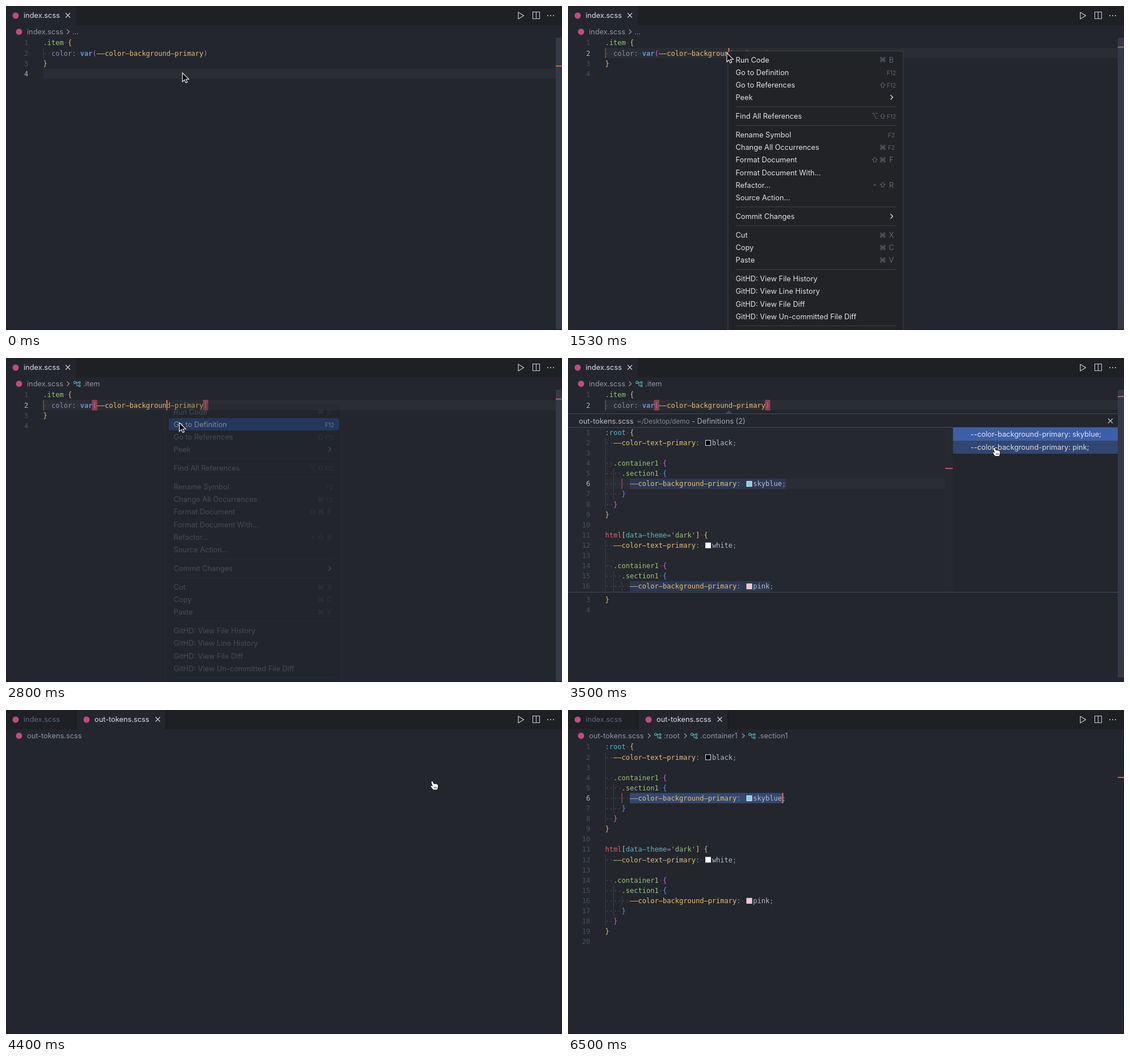
Recreate the animation shown at these times as an HTML page. Size 980 by 572 pixels, loop 6560 ms.

```html
<!DOCTYPE html>
<html lang="en">
<head>
<meta charset="utf-8">
<title>Go to definition</title>
<style>
  html, body { margin: 0; width: 100%; height: 100%; overflow: hidden; background: #23262d; }
  svg { display: block; }
  text { white-space: pre; }
  .ui { font-family: Inter, "DejaVu Sans", sans-serif; font-size: 12.8px; }
  .code { font-family: "DejaVu Sans Mono", monospace; font-size: 12.04px; }
  .key { font-family: Inter, "DejaVu Sans", sans-serif; fill: #65676d; }
</style>
</head>
<body>
<svg id="stage" width="980" height="572" viewBox="0 0 980 572"></svg>
<script>
const LOOP = 6560, CELL = 7.25, LINE = 18.1, LEFT = 65.5, TOP = 56, PEEK = 122.4;
const BG = '#23262d', BAR = '#1e2024', MARK = '#c2654f';
const GREEN = '#98c379', YELLOW = '#e3bd74', CYAN = '#56b6c2', BLUE = '#5b90ea',
      PINK = '#cc62d6', RED = '#d9626b', PLAIN = '#b4bac6', DIM = '#868c99', DOT = '#484d59';
const DEPTH = [YELLOW, PINK, BLUE];
const SWATCH = { black: '#000', white: '#fff', skyblue: '#87ceeb', pink: '#ffc0cb' };

const indexLines = ['.item {', '  color: var(--color-background-primary)', '}', ''];
const theme = (head, text, back) => [
  head + ' {', `  --color-text-primary: ${text};`, '', '  .container1 {', '    .section1 {',
  `      --color-background-primary: ${back};`, '    }', '  }', '}', ''];
const tokenLines = [
  ...theme(':root', 'black', 'skyblue'),
  ...theme("html[data-theme='dark']", 'white', 'pink')];

const col = n => LEFT + n * CELL;
const rect = (x, y, w, h, fill, extra = '') =>
  `<rect x="${x}" y="${y}" width="${w}" height="${h}" fill="${fill}" ${extra}/>`;
const label = (x, y, s, fill, extra = '') =>
  `<text class="ui" x="${x}" y="${y}" fill="${fill}" ${extra}>${s}</text>`;
const path = (d, stroke, w = 1.1, extra = '') =>
  `<path d="${d}" fill="none" stroke="${stroke}" stroke-width="${w}" ${extra}/>`;
const group = (id, body, extra = '') => `<g id="${id}" ${extra}>${body}</g>`;
const cross = (x, y, c) => path(`M${x - 4} ${y - 4}l8 8m0-8l-8 8`, c, 1.2);
const chevron = (x, y, c, s = 4) => path(`M${x - s / 2} ${y - s}l${s} ${s}l${-s} ${s}`, c, 1.3);
const fileDot = (x, y) => `<circle cx="${x}" cy="${y}" r="5.5" fill="#bf4c7c"/>`;

const rules = [
  [/^ /, () => DOT],
  [/^\.\w+/, () => GREEN],
  [/^:root/, () => CYAN],
  [/^html/, () => RED],
  [/^[\[\]]/, () => YELLOW],
  [/^data-theme/, () => CYAN],
  [/^'dark'/, () => GREEN],
  [/^--[\w-]+/, () => YELLOW],
  [/^color/, () => '#8790b3'],
  [/^var/, () => BLUE],
  [/^[()]/, () => PINK],
  [/^(black|white|skyblue|pink)/, () => PLAIN],
  [/^[{}]/, d => DEPTH[d]],
  [/^./, () => DIM]];

function codeLine(src, y, swatches) {
  const depth = Math.min(2, src.search(/\S/) / 2);
  let out = '', boxes = '', at = 0;
  while (src) {
    const [re, color] = rules.find(r => r[0].test(src));
    const word = src.match(re)[0];
    src = src.slice(word.length);
    if (SWATCH[word] && swatches) {
      boxes += rect(col(at) + 3, y - 8.6, 9, 9, SWATCH[word], 'stroke="#e8e8e8" stroke-width="1"');
      out += '\u00a0\u00a0';
      at += 2;
    }
    const shown = word.replace(/ /g, '·').replace(/-/g, '–');
    out += `<tspan fill="${color(depth)}"${word === 'var' ? ' font-weight="700"' : ''}>${shown}</tspan>`;
    at += word.length;
  }
  return `<text class="code" x="${LEFT}" y="${y}">${out}</text>${boxes}`;
}

const lineNo = (n, y, active) =>
  `<text class="code" x="39.3" y="${y}" text-anchor="end" fill="${active ? '#b0b4bd' : '#4a4f5e'}">${n}</text>`;

function codeBlock(lines, top, { active = 0, first = 1, swatches = false } = {}) {
  return lines.map((s, i) => {
    const y = top + LINE * i + 13.4;
    return lineNo(i + first, y, i + first === active) + codeLine(s, y, swatches);
  }).join('');
}

// Indent guide beside lines a..b (counted from 1)
const guide = (top, level, a, b, color = '#3d414b') =>
  rect(col(level * 2) + .1, top + LINE * (a - 1), 1, LINE * (b - a + 1), color);

const tokenGuides = top => [1, 11].map(s =>
  guide(top, 0, s + 1, s + 7) + guide(top, 1, s + 4, s + 6) +
  guide(top, 2, s + 5, s + 5, s === 1 ? '#b3624f' : undefined)).join('');

const tokenCode = (id, top) =>
  group(id + 'Raw', codeBlock(tokenLines, top, { active: 6 })) +
  group(id + 'Full', codeBlock(tokenLines, top, { active: 6, swatches: true }));

function symbol(x, name) {
  const c = CYAN;
  return path(`M${x + 4} 43h5M${x + 6} 43v6h3`, c) +
    [[2.5, 43, 2], [10.5, 43.5, 1.6], [10.5, 49, 1.6]].map(([a, y, r]) =>
      `<circle cx="${x + a}" cy="${y}" r="${r}" fill="none" stroke="${c}" stroke-width="1.1"/>`).join('') +
    label(x + 17, 50.4, name, '#9095a5');
}

function menuParts() {
  const sections = [
    [['Run Code', '⌘', 'B'], ['Go to Definition', '', 'F12'], ['Go to References', '⇧', 'F12'], ['Peek', '', '>']],
    [['Find All References', '⌥⇧', 'F12']],
    [['Rename Symbol', '', 'F2'], ['Change All Occurrences', '⌘', 'F2'], ['Format Document', '⇧⌘', 'F'],
     ['Format Document With...'], ['Refactor...', '^⇧', 'R'], ['Source Action...']],
    [['Commit Changes', '', '>']],
    [['Cut', '⌘', 'X'], ['Copy', '⌘', 'C'], ['Paste', '⌘', 'V']],
    ['File History', 'Line History', 'File Diff', 'Un-committed File Diff'].map(s => ['GitHD: View ' + s])];
  let y = 95, out = rect(282, 79.5, 309, 520, '#212327', 'rx="5" stroke="#43454b"');
  for (const rows of sections) {
    for (const [name, mods = '', key = ''] of rows) {
      out += label(295.5, y + 4.6, name, '#e0e1e3');
      [...mods].reverse().forEach((m, i) => {
        out += `<text class="key" x="${554.7 - 14 * i}" y="${y + (m === '^' ? 7 : 4.4)}" font-size="12.5" text-anchor="middle">${m}</text>`;
      });
      if (key === '>') out += chevron(570.5, y, '#e0e1e3');
      else if (key) out += `<text class="key" x="570" y="${y + 4.5}" font-size="${key[1] ? 10 : 12.8}" text-anchor="middle">${key}</text>`;
      y += 22.1;
    }
    out += rect(295.5, y - 6, 282.5, 1, '#414348');
    y += 11.05;
  }
  return out;
}

const picked = rect(287, 106, 300, 22, '#2854a8', 'rx="4"') +
  label(295.5, 121.7, 'Go to Definition', '#e8ebf2') +
  label(578.5, 121.6, 'F12', '#e0e6f4', 'text-anchor="end" style="font-size:10px"');

const peekTop = PEEK + LINE * 5;
const peek = path('M277.5 98.5l6-6l6 6z', 'none', 0, 'style="fill:#454b5c"') +
  rect(0, 98, 969, 316, BG) + rect(0, 122, 678, 291, '#25282f') +
  rect(0, 98, 969, 1, '#454b5c') + rect(0, 122, 969, 1, '#454b5c') + rect(0, 413, 969, 1, '#454b5c') +
  label(19, 115.6, 'out-tokens.scss', '#b9bdc7') +
  label(122, 115.6, '~/Desktop/demo', '#858a96', 'style="font-size:11.6px"') +
  label(218, 115.6, '- Definitions (2)', '#a6abb5') + cross(956, 111, '#c5c8cf') +
  group('peekBody',
    rect(LEFT, peekTop, 599, LINE, '#2b2d34') +
    rect(col(6), peekTop, 275, LINE, '#2c3852') + rect(col(6), PEEK + LINE * 15, 247, LINE, '#2c3852') +
    tokenGuides(PEEK) + tokenCode('peek', PEEK) +
    rect(665, 123, 13, 290, '#262930') + rect(665, 194, 13, 1.8, MARK), 'clip-path="url(#peekClip)"') +
  group('peekList',
    rect(678.5, 123, 290.5, 23, '#3d5fa6') + '<rect id="hover" x="678.5" y="146" width="290.5" height="23" fill="#32466f"/>' +
    label(709.5, 139.3, '--color-background-primary: skyblue;', '#e1e5ee') +
    label(709.5, 162.3, '--color-background-primary: pink;', '#d9dee9'));

const pairMark = n => rect(col(n) - .4, 74.4, 8, 17.6, '#8b404c', 'stroke="#a94f58" stroke-width=".8"');
const line2 = TOP + LINE;

const indexView =
  group('row4', rect(LEFT, TOP + LINE * 3, 903.5, LINE, '#2b2d34') + guide(TOP, 0, 2, 2)) +
  group('row2', rect(LEFT, line2, 903.5, LINE, '#2b2d34') + guide(TOP, 0, 2, 2, '#b3624f')) +
  group('pair', pairMark(12) + pairMark(39)) +
  group('head4', codeBlock(indexLines.slice(0, 2), TOP)) +
  group('head2', codeBlock(indexLines.slice(0, 2), TOP, { active: 2 })) +
  group('tail4', codeBlock(indexLines.slice(2), TOP + LINE * 2, { first: 3, active: 4 })) +
  group('tail2', codeBlock(indexLines.slice(2), TOP + LINE * 2, { first: 3 })) +
  rect(0, 0, 123, 34, BG) + fileDot(17, 17) + label(31, 21.4, 'index.scss', '#dcdee3') + cross(109, 16.5, '#d0d3d9') +
  fileDot(23, 45.5) + label(37, 50.4, 'index.scss', '#9095a5') + chevron(109.5, 45.5, '#9095a5') +
  group('crumbDots', label(117, 50.4, '...', '#9095a5')) + group('crumbItem', symbol(119, '.item')) +
  rect(969, 56, 11, 516, '#353846', 'id="slider"') + rect(969, 105, 11, 2, MARK, 'id="ruler"') +
  group('peek', peek);

const tokenView =
  rect(124, 0, 157.5, 34, BG) + rect(123, 0, 1, 34, '#18191d') + rect(281.5, 0, 1, 34, '#18191d') +
  fileDot(17, 17) + label(31, 21.4, 'index.scss', '#5d668f') +
  fileDot(142, 17) + label(156, 21.4, 'out-tokens.scss', '#dcdee3') + cross(267.5, 16.5, '#d0d3d9') +
  fileDot(23, 45.5) + label(37, 50.4, 'out-tokens.scss', '#9095a5') +
  group('crumbPath', [[143, ':root'], [207, '.container1'], [309, '.section1']].map(([x, s]) =>
    chevron(x, 45.5, '#9095a5') + symbol(x + 9, s)).join('')) +
  group('file', rect(col(6), TOP + LINE * 5, 269, LINE, '#344870') + tokenGuides(TOP) + tokenCode('file', TOP) +
    rect(969, 118, 11, 2, MARK));

const tools = path('M903 11v12l9.5-6z', '#c9ccd2', 1.2) +
  path('M928.5 10.5h12v12h-12zM934.5 10.5v12', '#c9ccd2') +
  [955, 960, 965].map(x => `<circle cx="${x}" cy="17" r="1.1" fill="#c9ccd2"/>`).join('');

const arrow = '<path d="M0 0V15.6L3.6 12.2L6 17.6L8.6 16.5L6.2 11.2H11.2Z" fill="#000" stroke="#fff" stroke-width="1.1"/>';
const hand = '<path d="M-3.4.8Q-2-.8-.5 1L1.5 5Q3 3.8 4.2 5Q5.8 4.2 6.6 5.5Q8.4 5 8.8 7.5V10.5L7.3 15.5H-.3L-4.6 9.4Q-5 7.3-2.8 8L-1.4 8.8L-3.7 2.5Z" fill="#fff" stroke="#111" stroke-width=".9"/>' +
  path('M1.6 10v3.2M3.7 10v3.2M5.8 10v3.2', '#222', .8);
const beam = path('M-3 0Q0 0 0 2V14Q0 16-3 16M3 0Q0 0 0 2M0 14Q0 16 3 16', '#e6e6e6');

const stage = document.getElementById('stage');
stage.innerHTML =
  '<clipPath id="peekClip"><rect x="0" y="123" width="678" height="290"/></clipPath>' +
  rect(0, 0, 980, 572, BG) + rect(0, 0, 980, 34, BAR) +
  group('indexView', indexView) + group('tokenView', tokenView) + tools +
  rect(0, 570.5, 980, 1.5, '#1e2029') +
  `<rect id="caret" width="2" height="${LINE}" fill="#e07a60"/>` +
  group('menu', menuParts()) + group('picked', picked) +
  group('pointer', group('arrow', arrow) + group('hand', hand) + group('beam', beam));

const el = {};
stage.querySelectorAll('[id]').forEach(n => el[n.id] = n);
const show = (id, on) => { el[id].style.display = on ? '' : 'none'; };
const set = (id, name, v) => el[id].setAttribute(name, v);
const clamp = v => Math.max(0, Math.min(1, v));
const ease = v => v * v * (3 - 2 * v);

// Pointer moves: start, end, target x, target y
const moves = [[60, 480, 313, 131], [720, 1300, 280, 83], [2100, 2330, 305.5, 114],
  [3170, 3460, 753, 158], [3850, 4080, 753, 125.5]];

function pointerAt(t) {
  let x = 311, y = 118;
  for (const [a, b, tx, ty] of moves) {
    const k = ease(clamp((t - a) / (b - a)));
    x += (tx - x) * k;
    y += (ty - y) * k;
  }
  return [x, y];
}

function draw(t) {
  const clicked = t >= 1480, aware = t >= 1700, peeking = t >= 2960, opened = t >= 4350;
  const loaded = t >= 4450, detailed = t >= 4650;

  show('indexView', !opened);
  show('tokenView', opened);
  for (const id of ['row4', 'head4', 'tail4']) show(id, !clicked);
  for (const id of ['row2', 'head2', 'tail2']) show(id, clicked);
  show('pair', aware);
  show('crumbDots', !aware);
  show('crumbItem', aware);
  set('ruler', 'y', peeking ? 67 : clicked ? 71.5 : 105);
  set('slider', 'height', peeking ? 508 : 516);
  set('tail2', 'transform', `translate(0 ${peeking ? 325.6 : 0})`);

  show('peek', peeking);
  show('peekBody', t >= 3030);
  show('peekList', t >= 3030);
  show('peekRaw', t < 3250);
  show('peekFull', t >= 3250);

  show('file', loaded);
  show('fileRaw', !detailed);
  show('fileFull', detailed);
  show('crumbPath', detailed);

  const fade = 1 - clamp((t - 2680) / 150);
  show('menu', clicked && fade > 0);
  show('picked', t >= 2600 && fade > 0);
  set('menu', 'opacity', fade);
  set('picked', 'opacity', Math.sqrt(fade) * .8 + fade * .2);

  let blink = t >= 200 && t < 700, cx = LEFT, cy = TOP + LINE * 3;
  if (clicked) {
    blink = !peeking && (t - 1500 < 500 || t >= 2500);
    cx = col(30) - .5;
    cy = line2;
  }
  if (opened) {
    blink = loaded && Math.floor((t - 4450) / 500) % 2 === 0;
    cx = 377.5;
    cy = TOP + LINE * 5;
  }
  show('caret', blink);
  set('caret', 'x', cx);
  set('caret', 'y', cy);

  const [x, y] = pointerAt(t);
  const over = peeking && x > 678 && !loaded;
  set('pointer', 'transform', `translate(${x.toFixed(2)} ${y.toFixed(2)})`);
  show('pointer', t < 5500);
  show('hand', over);
  show('beam', loaded);
  show('arrow', !over && !loaded);
  show('hover', over && y >= 146);
}

const start = performance.now();
function tick() {
  draw((performance.now() - start) % LOOP);
  requestAnimationFrame(tick);
}
tick();
</script>
</body>
</html>
```
